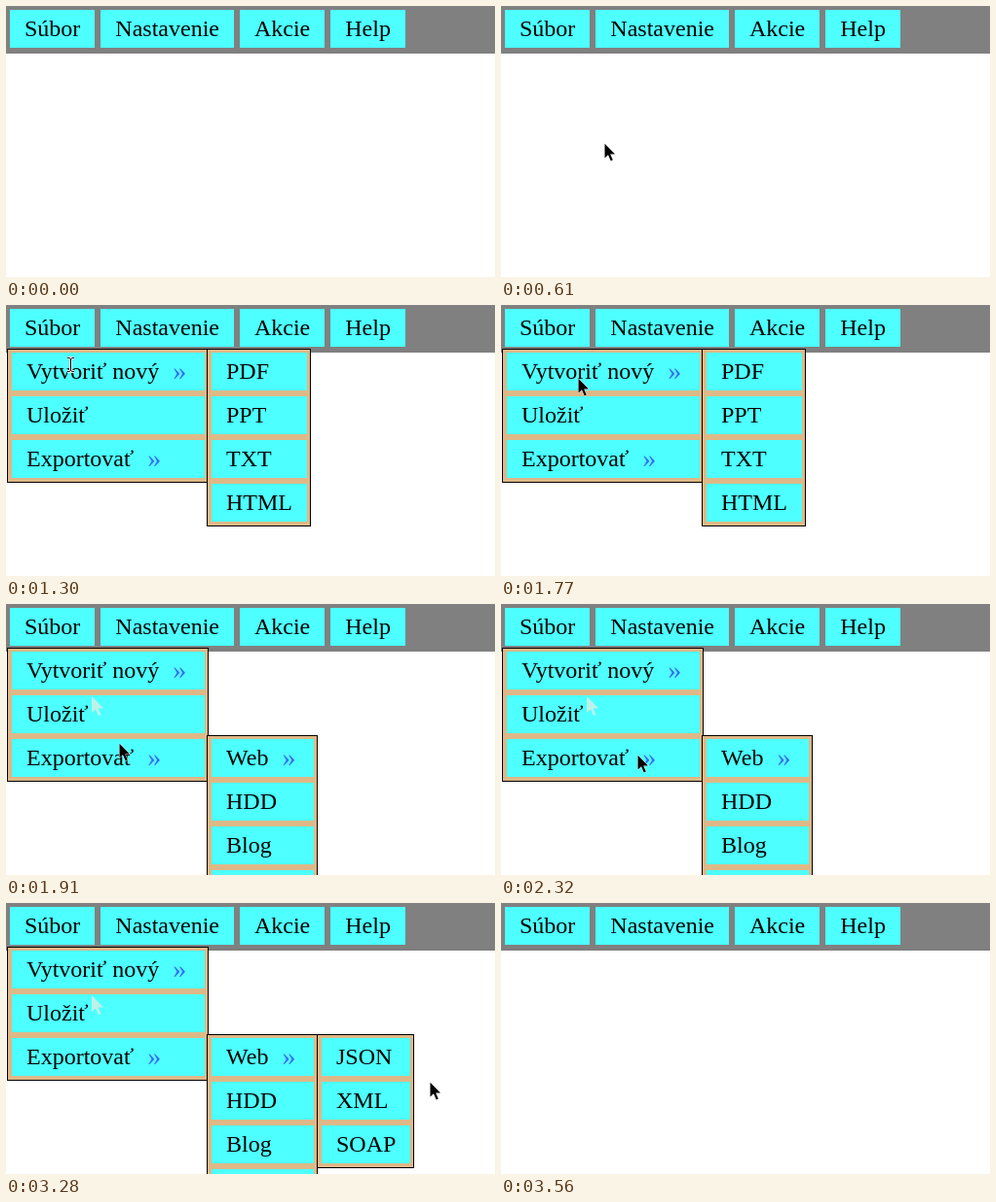
Recreate the animation shown at these times as an HTML page. Size 502 px wide and 279 px high, loop 3.83 s.

```html
<!DOCTYPE html>
<html lang="sk">
<head>
<meta charset="utf-8">
<title>Menu</title>
<style>
  html, body { margin: 0; width: 100%; height: 100%; overflow: hidden; background: #fff; }
  body { position: relative; font: 24px/27px "Liberation Serif", "Times New Roman", serif; color: #000; }
  ul { list-style: none; margin: 0; padding: 0; box-sizing: border-box; white-space: nowrap; }
  li { padding: 6px 15px; background: #4dffff; }

  .bar { display: flex; gap: 6px; height: 49px; padding: 4px; background: #808080; align-items: flex-start; }

  .menu { position: absolute; display: flex; flex-direction: column; gap: 6px; padding: 3px 3px 4px 4px; border: 1px solid #000; background: #deb887; }
  .more::after { content: "»"; position: relative; top: 1px; margin-left: 14px; font-size: 28px; line-height: 0; color: #3a6cf0; }
  .file { left: 1px; top: 45px; width: 207px; }
  .create { left: 206px; top: 45px; width: 107px; }
  .export { left: 206px; top: 135px; width: 114px; }
  .web { left: 319px; top: 135px; width: 100px; }

  svg { position: absolute; left: 0; top: 0; overflow: visible; }
  .trail { left: 88px; top: 95px; fill: #bdf2e9; }

  .menu, .trail, .cursor, .arrow, .beam { animation: 3830ms step-end infinite; }
  .file { animation-name: file; }
  .create { animation-name: create; }
  .export, .trail { animation-name: export; }
  .web { animation-name: web; }
  .cursor { animation-name: move; }
  .arrow { animation-name: arrow; }
  .beam { animation-name: beam; }

  @keyframes file { 0%, 91.12%, to { opacity: 0 } 23.23% { opacity: 1 } }
  @keyframes create { 0%, 48.04%, to { opacity: 0 } 33.94% { opacity: 1 } }
  @keyframes export { 0%, 91.12%, to { opacity: 0 } 49.86% { opacity: 1 } }
  @keyframes web { 0%, 91.12%, to { opacity: 0 } 64.22% { opacity: 1 } }

  /* The pointer turns into a text beam over labels. */
  @keyframes arrow {
    0%, 32.11%, 46.21%, 60.57%, 80.15%, to { opacity: 1 }
    25.06%, 33.94%, 51.69%, 66.31% { opacity: 0 }
  }
  @keyframes beam {
    0%, 32.11%, 46.21%, 60.57%, 80.15%, to { opacity: 0 }
    25.06%, 33.94%, 51.69%, 66.31% { opacity: 1 }
  }

  @keyframes move {
    0% { transform: translate(600px, 300px) }
    /* enter and approach the bar */
    2.87% { transform: translate(413px, 262px) }
    4.69% { transform: translate(380px, 251px) }
    6.52% { transform: translate(335px, 235px) }
    8.35% { transform: translate(285px, 215px) }
    10.18% { transform: translate(230px, 191px) }
    12.01% { transform: translate(180px, 168px) }
    13.83% { transform: translate(137px, 150px) }
    15.92% { transform: translate(106px, 141px) }
    17.75% { transform: translate(86px, 108px) }
    19.58% { transform: translate(66px, 74px) }
    21.4% { transform: translate(54px, 52px) }
    23.23% { transform: translate(49px, 37px) }
    25.06% { transform: translate(47px, 28px) }
    28.45% { transform: translate(46px, 23px) }
    30.28% { transform: translate(46px, 31px) }
    /* first entry */
    32.11% { transform: translate(53px, 46px) }
    33.94% { transform: translate(66px, 61px) }
    35.77% { transform: translate(72px, 63px) }
    37.59% { transform: translate(75px, 64px) }
    /* third entry */
    46.21% { transform: translate(79px, 75px) }
    48.04% { transform: translate(88px, 95px) }
    49.86% { transform: translate(116px, 143px) }
    51.69% { transform: translate(119px, 151px) }
    53.52% { transform: translate(121px, 154px) }
    55.35% { transform: translate(121px, 155px) }
    /* nested menu */
    60.57% { transform: translate(140px, 155px) }
    62.4% { transform: translate(180px, 155px) }
    64.22% { transform: translate(219px, 153px) }
    66.31% { transform: translate(230px, 153px) }
    /* leave */
    80.15% { transform: translate(265px, 154px) }
    81.98% { transform: translate(330px, 160px) }
    83.81% { transform: translate(395px, 172px) }
    85.63% { transform: translate(435px, 184px) }
    87.46% { transform: translate(458px, 199px) }
    89.29% { transform: translate(466px, 222px) }
    91.12% { transform: translate(464px, 258px) }
    92.95%, to { transform: translate(600px, 300px) }
  }
</style>
</head>
<body>
<ul class="bar"><li>Súbor</li><li>Nastavenie</li><li>Akcie</li><li>Help</li></ul>

<ul class="menu file"><li class="more">Vytvoriť nový</li><li>Uložiť</li><li class="more">Exportovať</li></ul>
<ul class="menu create"><li>PDF</li><li>PPT</li><li>TXT</li><li>HTML</li></ul>
<ul class="menu export"><li class="more">Web</li><li>HDD</li><li>Blog</li><li>&nbsp;</li></ul>
<ul class="menu web"><li>JSON</li><li>XML</li><li>SOAP</li></ul>

<svg class="trail" width="12" height="20"><path d="M0 0V17L4 13.5 7 20 9.500 19 6.500 12.500H12Z"/></svg>

<svg class="cursor" width="12" height="20">
  <path class="arrow" d="M.5 .8V15.500L4 12.300 6.700 18.500 8.800 17.600 6.200 11.500H11Z" stroke="#fff" paint-order="stroke"/>
  <g class="beam" fill="none">
    <path id="i" d="M-3 -6.500H-1L.5 -5.500 2 -6.500H4M.5 -5.500V6.500M-3 7.500H-1L.5 6.500 2 7.500H4" stroke="#fff" stroke-width="2.500"/>
    <use href="#i" style="stroke:#000"/>
    <path d="M-3 -6.500H-1L.5 -5.500 2 -6.500H4M.5 -5.500V6.500M-3 7.500H-1L.5 6.500 2 7.500H4" stroke="#000"/>
  </g>
</svg>
</body>
</html>
```
